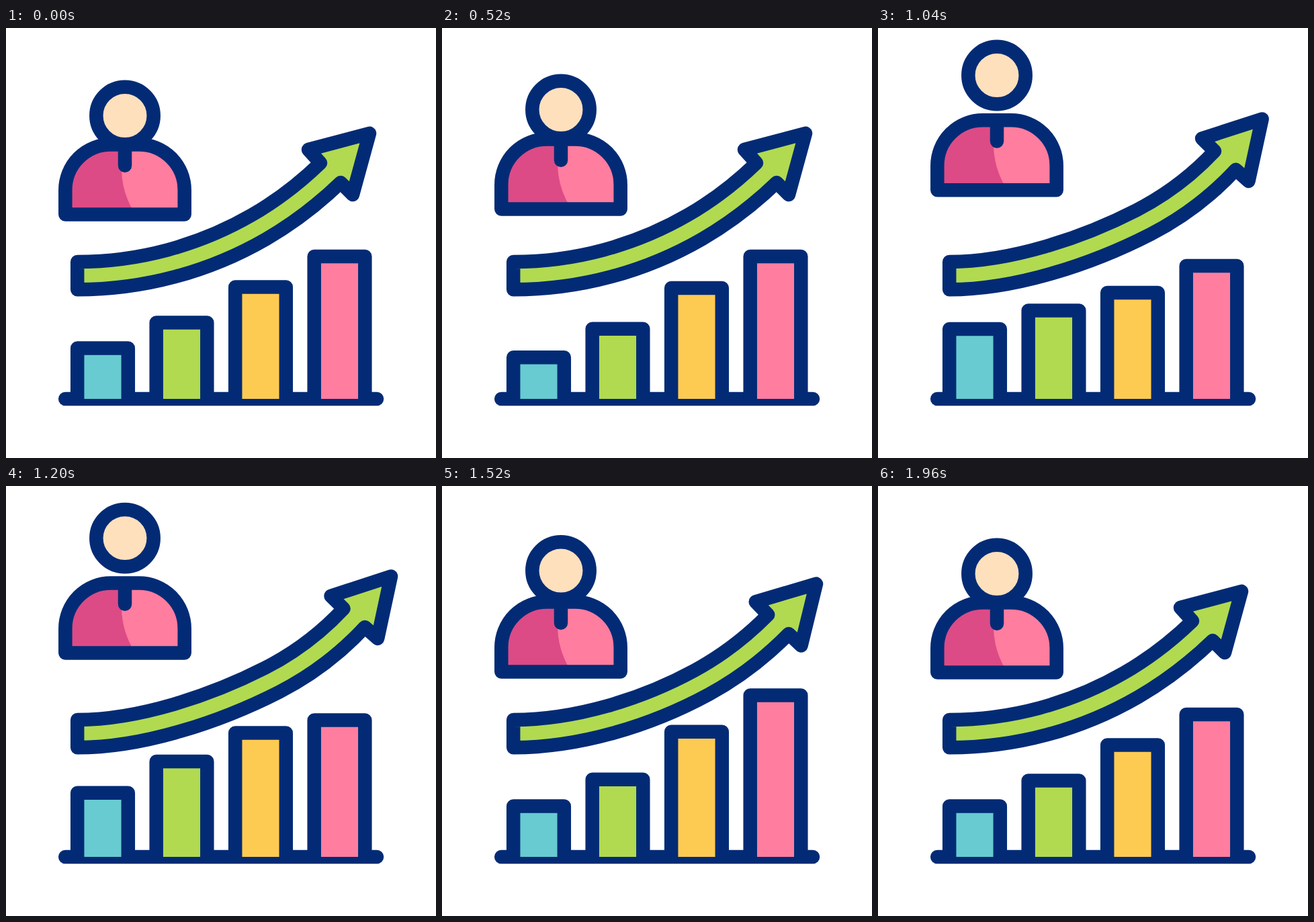
An HTML page for the animation above (2080 ms loop, 640 px wide and 640 px high).

```html
<!DOCTYPE html>
<html lang="en">
<head>
<meta charset="utf-8">
<title>Growth</title>
<style>
  html, body { margin: 0; width: 100%; height: 100%; overflow: hidden; background: #fff; }
  svg { display: block; width: 100vw; height: 100vh; }
  .line { stroke: #032b75; stroke-width: 20.5; stroke-linecap: round; stroke-linejoin: round; }
  .bar { stroke-linecap: butt; }
</style>
</head>
<body>
<svg viewBox="0 0 640 640">
  <g id="body">
    <path fill="#ff7d9f" d="M88.3 277.6V241.2A67.7 67.7 0 0 1 156 173.5H198A67.7 67.7 0 0 1 265.7 241.2V277.6Z"/>
    <path fill="#dc4b86" d="M88.3 277.6V241.2A67.7 67.7 0 0 1 156 173.5H172V212Q173 246 191 275V277.6Z"/>
    <path class="line" fill="none" d="M88.3 277.6V241.2A67.7 67.7 0 0 1 156 173.5H198A67.7 67.7 0 0 1 265.7 241.2V277.6ZM177 173.5V204.8"/>
  </g>
  <circle id="head" class="line" fill="#fee0bd" cx="177" cy="130.5" r="42.7"/>
  <path id="arrow" class="line" fill="#b1da51"/>
  <path class="line" d="M88.2 552H552"/>
  <path class="line bar" fill="#67cbd1"/>
  <path class="line bar" fill="#b1da51"/>
  <path class="line bar" fill="#fecb52"/>
  <path class="line bar" fill="#ff7d9f"/>
</svg>
<script>
const LOOP = 2080, STEP = 40, BAR_DELAY = 160;
const $ = id => document.getElementById(id);
const bars = [...document.querySelectorAll('.bar')];
const barTops = [476.5, 438.5, 385.5, 340];

// Each track is a list of [time, value] keys.
const barTrack = [[80, 0], [560, 14], [600, 14], [1040, -28.5], [1440, 0]];
const headTrack = [[310, 0], [1030, -60], [1040, -60], [1650, 0]];
const bodyTrack = [[300, 0], [940, -36.5], [1000, -36.5], [1600, 0]];
const arrowTrack = [[540, 0], [1140, 1], [1200, 1], [1840, 0]];

// cubic-bezier(.5, 0, .5, 1)
function ease(x) {
  let lo = 0, hi = 1;
  for (let i = 0; i < 24; i++) {
    const s = (lo + hi) / 2;
    if (1.5 * s * (1 - s) + s ** 3 < x) lo = s; else hi = s;
  }
  return lo * lo * (3 - 2 * lo);
}

function sample(track, t) {
  if (t <= track[0][0]) return track[0][1];
  for (let i = 1; i < track.length; i++) {
    const [t0, a] = track[i - 1], [t1, b] = track[i];
    if (t < t1) return a + (b - a) * ease((t - t0) / (t1 - t0));
  }
  return track[track.length - 1][1];
}

const rad = deg => deg * Math.PI / 180;
const along = ([x, y], deg, len) => [x + len * Math.cos(rad(deg)), y - len * Math.sin(rad(deg))];
const str = points => points.map(p => p.map(v => v.toFixed(2)).join(' ')).join(' ');

// Points of one shaft edge: an arc of radius r at rest, straightened as p grows.
function shaftEdge(r, tailY, end, p) {
  const tail = [106.2, tailY];
  const bend = 30 - 3 * p, reach = r * 0.0816 * (1 + 0.16 * p);
  const node = [
    106.2 + r * Math.sin(rad(30)) + 19.5 * p,
    tailY - r * (1 - Math.cos(rad(30))) - 7.5 * p
  ];
  return [
    tail, along(tail, 0, r * 0.1755), along(node, bend, -r * 0.1755),
    node, along(node, bend, reach), along(end, 44 + 3 * p, -reach), end
  ];
}

function arrowPath(p) {
  const c = Math.cos(rad(3.2 * p)), s = Math.sin(rad(3.2 * p));
  const tip = [541 + 32 * p, 156.8 - 22.3 * p];
  const turn = (x, y) => [tip[0] + x * c + y * s, tip[1] + y * c - x * s];
  const notchA = turn(-73, 44), barbA = turn(-91, 24.2);
  const barbB = turn(-25, 91.2), notchB = turn(-43, 73.2);
  const upper = shaftEdge(519, 348, notchA, p);
  const lower = shaftEdge(562, 389.3, notchB, p).reverse();
  return `M${str(upper.slice(0, 1))}C${str(upper.slice(1))}` +
    `L${str([barbA, tip, barbB, notchB])}C${str(lower.slice(1))}Z`;
}

function draw() {
  const t = Math.floor(performance.now() % LOOP / STEP) * STEP;
  $('head').setAttribute('transform', `translate(0 ${sample(headTrack, t)})`);
  $('body').setAttribute('transform', `translate(0 ${sample(bodyTrack, t)})`);
  $('arrow').setAttribute('d', arrowPath(sample(arrowTrack, t)));
  bars.forEach((bar, i) => {
    const x = 106.2 + 117.5 * i;
    const y = barTops[i] + sample(barTrack, t - BAR_DELAY * i);
    bar.setAttribute('d', `M${x} 552V${y}H${x + 75.6}V552`);
  });
  requestAnimationFrame(draw);
}
draw();
</script>
</body>
</html>
```
